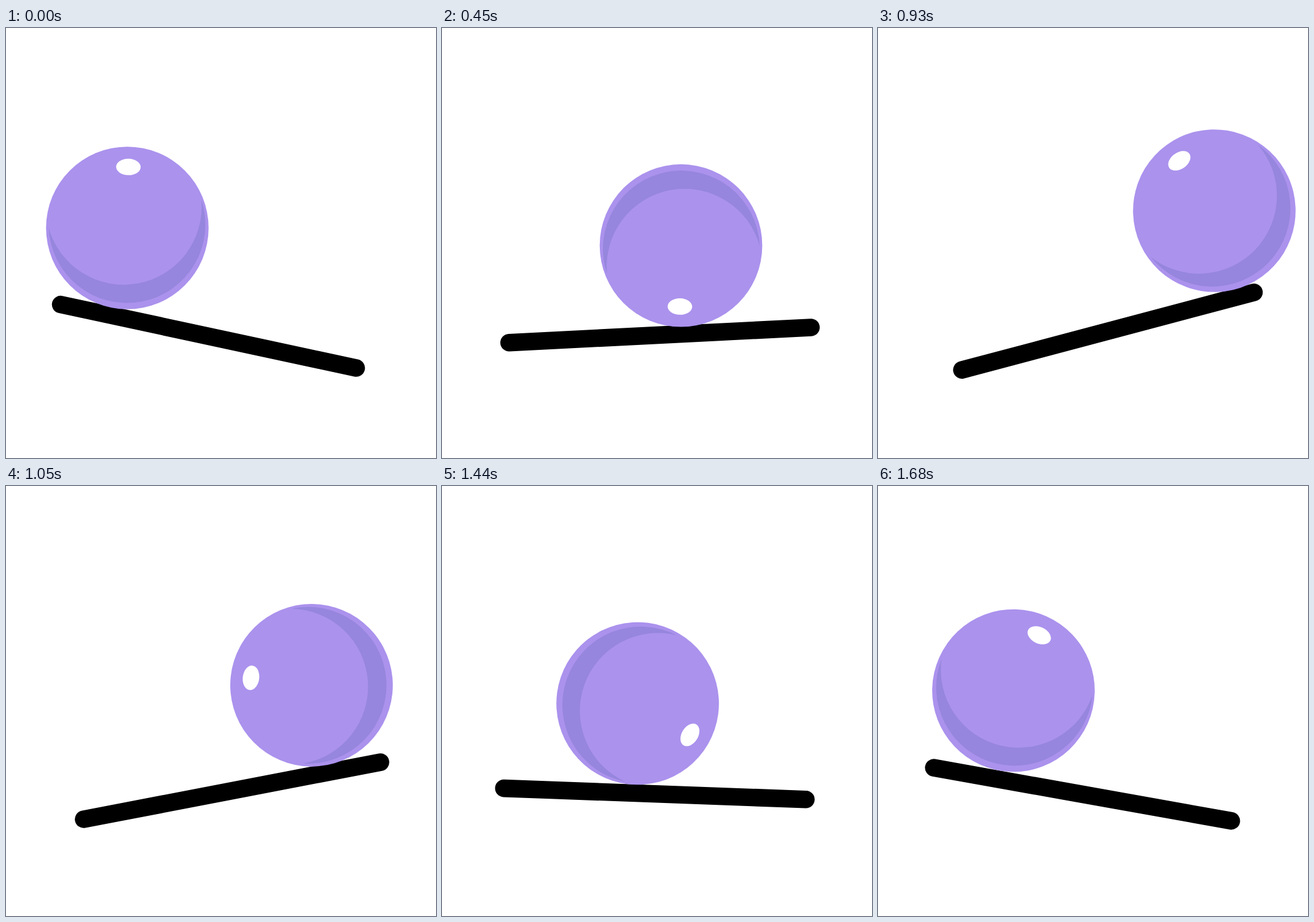
These frames come from a looping animation (700x700 px, 1.71 s). An HTML page:

```html
<!DOCTYPE html>
<html lang="en">
<head>
<meta charset="utf-8">
<title>Rolling ball</title>
<style>
  html, body { margin: 0; height: 100%; overflow: hidden; background: #fff; }
  svg { display: block; width: 100%; height: 100%; }
</style>
</head>
<body>
<svg viewBox="0 0 700 700">
  <path id="bar" d="M-230.6 96.3h492" stroke="#000" stroke-width="28.6" stroke-linecap="round"/>
  <g id="ball">
    <circle r="132.3" fill="#ab92ed"/>
    <path d="M-128 0A127.6 127.6 0 1 0 120.5-46A126.9 126.9 0 0 1-128 0" fill="#9686dd"/>
    <ellipse cy="-99.3" rx="20" ry="13.4" fill="#fff" transform="rotate(1)"/>
  </g>
</svg>
<script>
const LOOP = 1710, STEP = 30, TURN = 29, LAST = 27.14;
const bar = document.getElementById('bar');
const ball = document.getElementById('ball');

// Ball centre along the way: [step, x, y]
const path = [
  [0, 197.5, 325.5], [2, 220.5, 333], [8, 293, 352], [10, 318.5, 354],
  [18, 431.5, 348], [22, 484.5, 330], [27, 547.5, 297.5], [28, 559.8, 290]
];

const slope = (a, b, k) => (b[k] - a[k]) / (b[0] - a[0]);

// Tangent at knot i, weighted for uneven spacing
function tangent(i, k) {
  const p = path[i], before = path[i - 1], after = path[i + 1];
  if (!before) return slope(p, after, k);
  if (!after) return slope(before, p, k);
  const h0 = p[0] - before[0], h1 = after[0] - p[0];
  return (slope(before, p, k) * h1 + slope(p, after, k) * h0) / (h0 + h1);
}

function along(u, k) {
  let i = 0;
  while (u > path[i + 1][0]) i++;
  const a = path[i], b = path[i + 1], h = b[0] - a[0];
  const s = (u - a[0]) / h, r = 1 - s;
  return a[k] * r * r * (1 + 2 * s) + b[k] * s * s * (3 - 2 * s)
    + h * s * r * (tangent(i, k) * r - tangent(i + 1, k) * s);
}

function draw(now) {
  const n = Math.floor((now % LOOP) / STEP + 1e-6);
  const u = Math.min(n, 2 * TURN - n, LAST);   // out, short hold, back
  bar.setAttribute('transform', `translate(334.7 404.4) rotate(${12.12 - u})`);
  ball.setAttribute('transform', `translate(${along(u, 1)} ${along(u, 2)}) rotate(${12 * u})`);
}

const start = performance.now();
function tick() {
  draw(performance.now() - start);
  requestAnimationFrame(tick);
}
tick();
</script>
</body>
</html>
```
